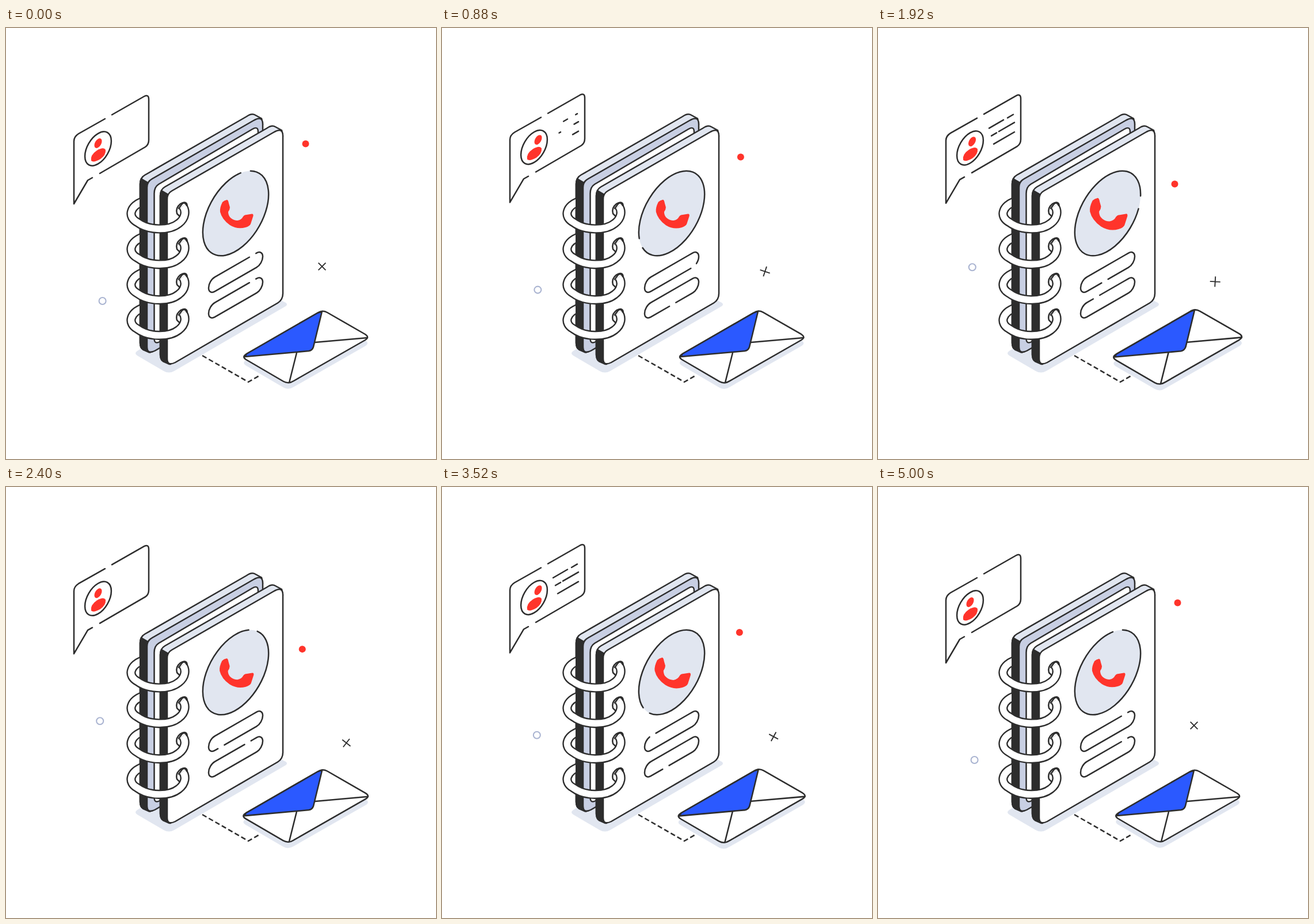
Recreate the animation shown at these times as an HTML page. Size 747 by 750 pixels, loop 5040 ms.

```html
<!DOCTYPE html>
<html lang="en">
<head>
<meta charset="utf-8">
<title>Contact book</title>
<style>
  html, body { margin: 0; width: 100%; height: 100%; overflow: hidden; background: #fff; }
  svg { display: block; width: 747px; height: 750px; }
  .line { fill: none; stroke: #2d2d2d; stroke-width: 2.5; stroke-linecap: round; stroke-linejoin: round; }
  .white { fill: #fff; }
  .light { fill: #e1e6f0; }
  .mid { fill: #c8cfe3; }
  .dark { fill: #2d2d2d; }
  .red { fill: #ff342b; }
  .blue { fill: #2b59ff; }
</style>
</head>
<body>
<svg viewBox="0 0 747 750">
  <defs>
    <path id="face" d="M280 298Q280 288 288 283.500L465 181.500Q481 172 481 188V462Q481 473 472 478.500L294 582Q280 589 280 575Z"/>
    <g id="slab">
      <path class="line light" d="M268 292Q268 281 276 276.500L453 174.500Q462 168 468 172L479 178L481 188L286 585L273 580Q268 577 268 568Z"/>
      <path class="line dark" d="M268 292Q268 287 270 283L282 290Q280 294 280 298V575Q280 582 284 585L273 580Q268 577 268 568Z"/>
    </g>
    <path id="band" d="M240 301C214 310 211 329 228 338C248 353 284 353 300 340C312 331 313 318 307 310"/>
    <g id="ring" fill="none">
      <path class="line" d="M302 328L297 323Q294 313 303 306Q311 301 314 306Q316 310 312 317"/>
      <use href="#band" stroke="#2d2d2d" stroke-width="16.200"/>
      <use href="#band" stroke="#fff" stroke-width="11.400"/>
      <path class="line" d="M300 314L306 306Q311 302 314 309"/>
      <rect class="dark" x="232" y="291" width="13" height="22"/>
    </g>
    <path id="letter" d="M418 567L541 496Q549 490 558 495L624 533Q632 538 624 543L500 614Q491 620 482 615L417 577Q409 572 418 567Z"/>
  </defs>

  <path class="light" d="M228 562L250 548L474 472L486 478Q490 481 486 484L292 597Q283 602 274 597L228 570Q222 566 228 562Z"/>
  <path id="dashes" class="line" style="stroke-linecap:butt" stroke-dasharray="8.5 4.5" d="M341 570L421 616L441 604.5"/>

  <g transform="translate(-35 -20.5)">
    <use href="#slab"/>
    <use href="#face" class="line mid"/>
  </g>
  <path class="line white" d="M257.500 288Q257.500 277 265 272L428 176Q438 170 438 181V300L267 546Q257.500 551 257.500 540Z"/>
  <use href="#slab"/>
  <use href="#face" class="line white"/>
  <g id="rings"></g>

  <ellipse class="light" cx="399" cy="322.500" rx="80.800" ry="46.700" transform="rotate(-60 399 322.500)"/>
  <path id="disc" class="line"/>
  <path id="pillA" class="line"/>
  <path id="pillB" class="line"/>
  <path id="phone" class="red" d="M376 303Q379 300 384 299Q386 299 387 305L389 312Q389 316 386 320Q386 327 391 331Q396 335 402 335Q409 334 412 328Q414 325 418 325L427 323.500Q430 323 429.500 327L425 341Q423 345 416 347Q402 351 389 343Q375 333 372 320Q371 313 376 303Z"/>

  <g id="mail">
    <use href="#letter" class="light" y="10.500"/>
    <use href="#letter" class="line white"/>
    <path class="line" d="M537 547L628 539M505 565L492 617"/>
    <path class="line blue" d="M415 572L418 567L541 496L549 493L534 555Q532 561 526 562Z"/>
  </g>

  <g id="bubble">
    <path class="line" d="M172 158L126 184Q118 189 118 197V306L142 265L150 260.500M163 253L242 207Q248 203 248 195V124Q248 115 240 119L184 151"/>
    <ellipse class="line" cx="160" cy="210" rx="32.400" ry="18.700" transform="rotate(-60 160 210)"/>
    <path class="red" d="M148 231Q146 221 158 213Q170 206 173 212Q174 221 164 228Q152 235 148 231Z"/>
    <g id="head"><ellipse class="red" cx="160" cy="200.500" rx="9.200" ry="5.400" transform="rotate(-60 160 200.500)"/></g>
    <path id="notes" class="line"/>
  </g>

  <circle id="dot" class="red" r="6"/>
  <circle id="hoop" r="6" fill="none" stroke="#aab4d1" stroke-width="2.100"/>
  <path id="cross" class="line" style="stroke-width:1.9;stroke-linecap:butt" d="M-9 0H9M0-9V9"/>
</svg>
<script>
  const LOOP = 5040, SPAN = 5000;
  const $ = id => document.getElementById(id);
  const set = (id, name, value) => $(id).setAttribute(name, value);
  const clamp = x => Math.min(1, Math.max(0, x));
  const ease = x => (x = clamp(x), x * x * (3 - 2 * x));
  const ramp = (x, a, b) => ease((x - a) / (b - a));
  // There and back, n times per loop
  const swing = (p, n) => ease(1 - Math.abs(1 - 2 * (p * n % 1)));

  // Point on the right-hand isometric plane
  const iso = (cx, cy, u, v) => `${(cx + 0.866 * u).toFixed(2)} ${(cy - 0.5 * u + v).toFixed(2)}`;
  const arc = (r, big, end) => `A${1.2247 * r} ${0.7071 * r} -60 ${big} 1 ${end}`;

  const PILL = 244, GAP = 13;
  function makePill(id, cy) {
    const r = 12.5, w = 41.8, at = (u, v) => iso(399, cy, u, v);
    set(id, "d", `M${at(34, -r)}L${at(w, -r)}${arc(r, 0, at(w, r))}L${at(-w, r)}${arc(r, 0, at(-w, -r))}Z`);
    set(id, "pathLength", PILL);
    set(id, "stroke-dasharray", `${PILL - GAP} ${GAP}`);
  }
  makePill("pillA", 425);
  makePill("pillB", 469.5);

  $("rings").innerHTML = [0, 1, 2, 3].map(i => `<use href="#ring" y="${i * 61.8}"/>`).join("");

  // Each stroke: left end, right end
  const NOTES = [
    [193, 175.5, 218, 161], [225, 157.5, 235, 151.7],
    [197, 188.8, 206, 183.6], [210, 181.2, 237, 165.6],
    [201, 203, 237, 182.2]
  ];

  function discPath(p) {
    const r = 66, mid = 18 - 720 * p;
    const at = deg => {
      const a = deg * Math.PI / 180;
      return iso(399, 322.5, r * Math.sin(a), -r * Math.cos(a));
    };
    return `M${at(mid + 9)}${arc(r, 1, at(mid - 9))}`;
  }

  const zoom = (x, y, s) => `translate(${x} ${y}) scale(${s}) translate(${-x} ${-y})`;
  const move = (id, x, y, extra = "") => set(id, "transform", `translate(${x} ${y})${extra}`);

  function draw(t) {
    const p = Math.min(t, SPAN) / SPAN;
    const drift = swing(p, 1), pulse = swing(p, 6), half = p * 2 % 1;

    move("dot", 520.5 - 5.8 * drift, 201.5 + 81 * drift);
    move("hoop", 167.6 - 4.4 * drift, 475 - 68 * drift);
    move("cross", 549 + 42.5 * drift, 415 + 30.5 * drift, ` rotate(${45 + 360 * p})`);

    set("mail", "transform", zoom(520.5, 556, 1 + 0.055 * pulse));
    set("phone", "transform", zoom(400.7, 324, 1 + 0.2 * pulse));

    move("bubble", 0, -17.6 * swing(p, 5));
    const nod = ramp(half, 0.131, 0.288) - ramp(half, 0.69, 0.847);
    move("head", 7 * nod, -3.4 * nod);

    const shown = ramp(t, 500, 1600) - ramp(t, 2000, 2400) + ramp(t, 2400, 3500) - ramp(t, 4500, 5000);
    set("notes", "d", shown < 0.01 ? "" : NOTES.map(([x, y, X, Y]) =>
      `M${X} ${Y}L${X + (x - X) * shown} ${Y + (y - Y) * shown}`).join(""));

    set("disc", "d", discPath(p));
    set("pillA", "stroke-dashoffset", -(p * PILL + GAP / 2));
    set("pillB", "stroke-dashoffset", -(p * 2 * PILL + GAP / 2));
    set("dashes", "stroke-dashoffset", -13 * ramp(t, 4000, 4640));
  }

  const start = performance.now();
  function tick() {
    draw((performance.now() - start) % LOOP);
    requestAnimationFrame(tick);
  }
  tick();
</script>
</body>
</html>
```
